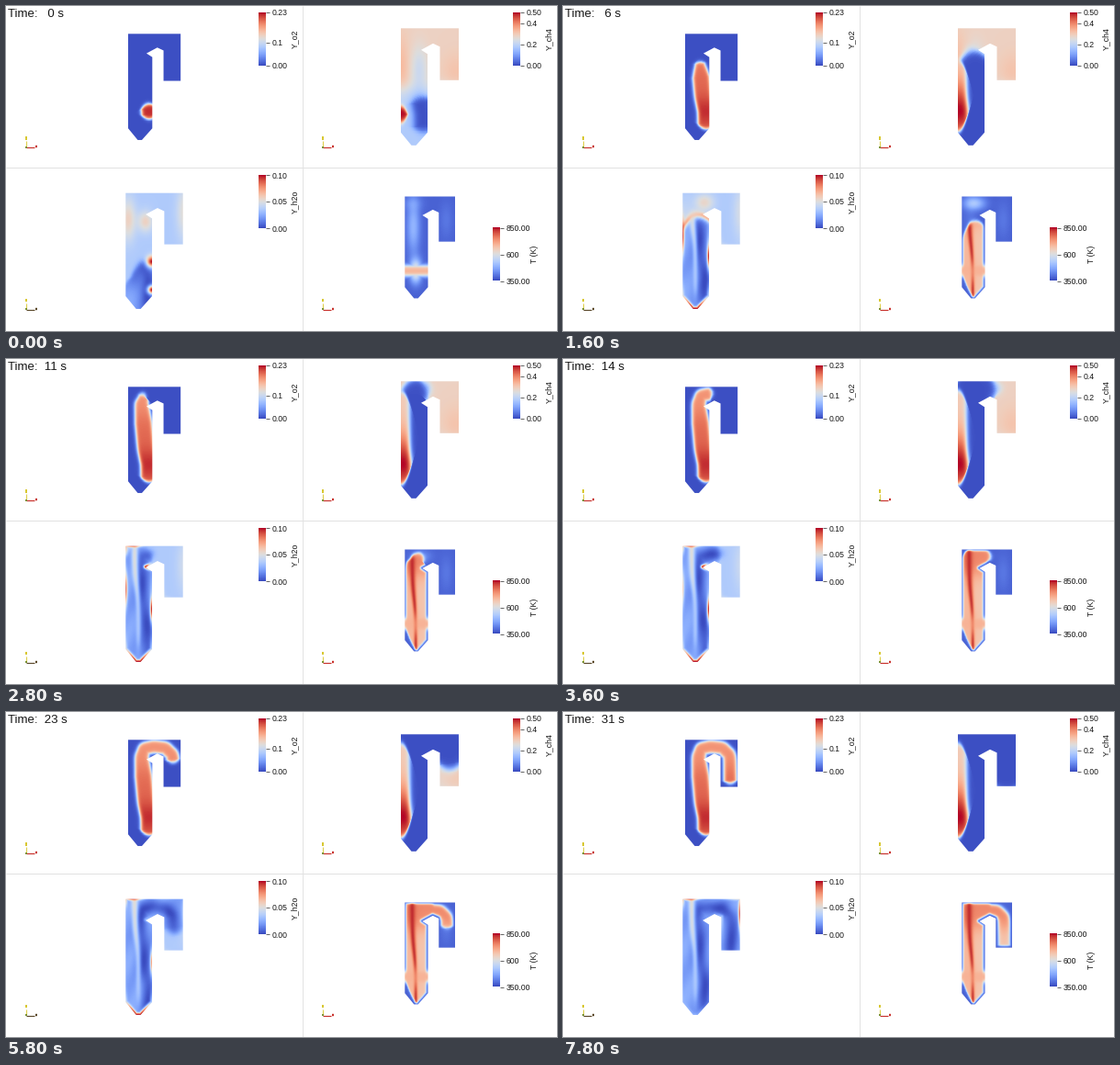
A matplotlib script for the animation above (8 s loop, 600 px wide and 354 px high).

```python
import numpy as np
import matplotlib.pyplot as plt
from matplotlib.animation import FuncAnimation
from matplotlib.patches import Polygon

W, H, DPI = 600, 354, 100
FRAMES, STEP = 40, 200
FONT = "Liberation Sans"
INK = "#161616"

# Reactor outline in its own units: riser, hood, and side duct.
OUTLINE = np.array([
    (0, 0), (63, 0), (63, 56.5), (42.5, 56.5), (42.5, 20), (35, 16.5),
    (22, 23.5), (29, 28), (29, 113.5), (16.5, 127.5), (11.5, 127.5), (0, 113.5)])
# Centre line of the gas stream.
STREAM = np.array([(25, 128), (25, 94), (21, 75), (18, 42), (16, 22),
                   (19, 12), (30, 9.5), (44, 11), (53, 20), (53.5, 60)])
INLET = 94
X, Y = np.meshgrid(np.arange(63) + 0.5, np.arange(128) + 0.5)


def soft(z):
    return 1 / (1 + np.exp(-np.clip(z, -40, 40)))


def bell(z):
    return np.exp(-z * z)


def blob(x, y, rx, ry):
    return bell((X - x) / rx) * bell((Y - y) / ry)


def mix(f, mask, value):
    return f + (value - f) * mask


def wall_distance():
    best = np.full(X.shape, 99.0)
    for (ax_, ay), (bx, by) in zip(OUTLINE, np.roll(OUTLINE, -1, axis=0)):
        dx, dy = bx - ax_, by - ay
        t = np.clip(((X - ax_) * dx + (Y - ay) * dy) / (dx * dx + dy * dy), 0, 1)
        best = np.minimum(best, np.hypot(X - ax_ - t * dx, Y - ay - t * dy))
    return best


def stream_coords():
    """Length along the stream, zero at the inlet, and distance from it."""
    u = np.linspace(0, len(STREAM) - 1, 400)
    bump = np.hanning(35) / np.hanning(35).sum()
    px, py = (np.convolve(
        np.pad(np.interp(u, np.arange(len(STREAM)), c), 17, "reflect",
               reflect_type="odd"), bump, "valid") for c in STREAM.T)
    arc = np.r_[0, np.cumsum(np.hypot(np.diff(px), np.diff(py)))]
    arc -= arc[np.argmin(abs(py[:200] - INLET))]
    dist = np.hypot(X[..., None] - px, Y[..., None] - py)
    return arc[dist.argmin(-1)], dist.min(-1)


WALL = wall_distance()
ALONG, ACROSS = stream_coords()


def front(s):
    return 9 + 16 * s ** 0.64


def plume(head, tail, width, k=1.1, bend=16):
    """Soft body of gas with a rounded head and tail."""
    cap = ACROSS ** 2 / bend
    edge = np.minimum(head - ALONG - cap, ALONG + tail - cap)
    return soft(np.minimum(edge, width - ACROSS) / k)


def oxygen(s):
    head = front(s)
    width = np.interp(ALONG, (50, 80), (10, 7.5))
    width = width * np.clip(0.3 + (head - ALONG) / 40 + s / 25, 0, 1)
    if s == 0:
        width = 9
    m = plume(head, 9 + 3 * min(s, 4), width)
    value = 0.76 + 0.1 * soft((Y - 35) / 8) + 0.1 * bell((Y - INLET) / 18)
    return mix(0.01, m, value)


def purge(s):
    return plume(front(s) + 10, 19 + 10 * s, 11 + 6 * s, 2.2, 24)


def methane(s):
    f = (0.57 + 0.09 * blob(0, 45, 9, 35) + 0.06 * blob(60, 50, 15, 22)
         - 0.13 * blob(20, 45, 9, 25) - 0.22 * soft((Y - 66) / 5))
    f = mix(f * (1 - 0.27 * (s / 31) ** 6), purge(s), 0.01)
    rise = min(front(s), 84)
    sides = 9.5 + 2 * bell((Y - INLET) / 15) - X
    ends = np.minimum(rise - INLET + Y, 9 + 2.5 * min(s, 4) + INLET - Y) - X ** 2 / 6
    m = soft(np.minimum(sides, ends) / 1.5)
    return mix(f, m, 0.6 + 0.4 * bell((Y - 90) / 32))


# Saturated spots: x, y, reach along the wall, first and last second.
SPOTS = ((0, 48, 14, 3, 14), (29, 70, 10, 3, 24), (8, 0, 7, 9, 60),
         (38, 0, 10, 15, 20), (63, 17, 13, 24, 60), (22, 23, 4, 9, 21),
         (14, 126, 14, 3, 28))


def steam(s):
    start = np.exp(-s / 5)
    f = (0.35 + 0.22 * start * (blob(22, 32, 8, 11) + blob(3, 30, 8, 22))
         + 0.17 * np.exp(-s / 20) * blob(64, 22, 8, 28)
         + 0.2 * bell((s - 6) / 3) * blob(24, 11, 10, 9))
    m = plume(front(s) + 10, 60, 30, 2, 24)
    calm = (0.22 - 0.19 * bell(ACROSS / 8) + 0.03 * np.sin(Y / 9 + X / 5 + s / 4)
            - 0.12 * start * blob(12, 92, 9, 20))
    f = mix(f, m, calm) + 1.5 * bell((s - 6) / 3) * m * (1 - m) * (Y < 70)

    top = soft((45 - Y) / 9)
    streak = bell((X - 14 + 4 * top) / (2.6 + top)) * soft((110 - Y) / 5)
    f = mix(f, 0.85 * streak * m * min(s / 5, 1), 0.36 + 0.2 * top)

    for y, r in ((76, 6), (107, 4.5)):
        f = mix(f, blob(29, y, r, r) * bell(s / 2), 1)
    rim = bell(WALL / 2)
    for x, y, reach, on, off in SPOTS:
        live = soft((s - on) * 2) * soft((off - s) / 1.2)
        f = mix(f, rim * blob(x, y, reach, reach) ** 0.6 * live, 1)
    return f


def heat(s):
    grow = min(s / 3, 1)
    head = front(s) + 4
    lead = min(10 + s, 55)
    f = (0.05 + 0.05 * blob(52, 30, 8, 22) + 0.22 * np.exp(-s / 4) * blob(11, 38, 8, 34)
         + 0.28 * bell((s - 6) / 5) * blob(lead, 9, 13, 8))
    width = np.interp(ALONG, (70, 100), (30, 7.5))
    m = plume(head, 9 + 30 * grow, width, 1.2) * soft((WALL - 2) / 0.6) * grow
    left = 0.05 * soft((14 - X) / 3)
    f = mix(f, m, 0.62 + left + 0.17 * soft((32 - Y) / 6))
    band = np.maximum(soft((6.5 - abs(Y - INLET + 1)) / 1.5), 0.8 * blob(14, 93, 7, 14))
    f = mix(f, band, 0.68)
    centre = 14 - 4.5 * soft((60 - Y) / 12)
    core = bell((X - centre) / (2.3 + 1.2 * soft((60 - Y) / 8)))
    fade = 1 - 0.6 * bell((Y - INLET) / 14)
    return mix(f, core * fade * m, 0.96)


fig = plt.figure(figsize=(W / DPI, H / DPI), dpi=DPI, facecolor="white")
ax = fig.add_axes([0, 0, 1, 1])
ax.axis("off")


def text(x, y, label, px, **kw):
    return ax.text(x, y, label, fontsize=px * 72 / DPI, family=FONT, color=INK, **kw)


def line(xs, ys, color, width):
    ax.plot(xs, ys, color=color, lw=width * 72 / DPI, solid_capstyle="butt")


def picture(data, x0, y0, x1, y1):
    return ax.imshow(data, extent=(x0, x1, y1, y0), cmap="coolwarm", vmin=0, vmax=1,
                     interpolation="bilinear", aspect="auto")


def vessel(field, x, y, scale):
    img = picture(field(0), x, y, x + 63 * scale, y + 128 * scale)
    img.set_clip_path(Polygon(OUTLINE * scale + (x, y), transform=ax.transData))
    return img, field


def colorbar(x, y, ticks, title):
    picture(np.linspace(1, 0, 64)[:, None], x, y, x + 8, y + 58)
    for at, label in ticks:
        ty = y + 58 * at
        line([x + 7.5, x + 12], [ty, ty], "#555555", 0.9)
        text(x + 14.5, ty, label, 8.6, va="center_baseline")
    tx = x + (45 if x == 530 else 40)
    text(tx, y + 29, title, 8.8, rotation=90, ha="center", va="center")


def triad(x, y, base):
    line([x, x], [y - 12, y - 8.5], "#d8c832", 2)
    line([x + 0.5, x + 0.5], [y - 7, y - 1], "#e0d050", 1.2)
    line([x + 0.5, x + 9], [y, y], base, 1.2)
    line([x - 0.8, x + 1.2], [y - 0.5, y - 0.5], "#6f8a2a", 1.8)
    line([x + 10.5, x + 12.8], [y - 0.8, y - 0.8], base, 2.4)


line([322.7, 322.7], [0, H], "#e2e2e2", 1)
line([0, W], [175.7, 175.7], "#e2e2e2", 1)

views = [vessel(oxygen, 133, 30.3, 0.907), vessel(methane, 430, 24.3, 1.0),
         vessel(steam, 130.3, 203.7, 0.99), vessel(heat, 434.3, 207.5, 0.87)]

colorbar(275, 7, [(0, "0.23"), (0.565, "0.1"), (1, "0.00")], "Y_o2")
colorbar(552, 7, [(0, "0.50"), (0.2, "0.4"), (0.6, "0.2"), (1, "0.00")], "Y_ch4")
colorbar(275, 184, [(0, "0.10"), (0.5, "0.05"), (1, "0.00")], "Y_h2o")
colorbar(530, 241.5, [(0, "850.00"), (0.5, "600"), (1, "350.00")], "T (K)")

for tx in (21.5, 344.5):
    for ty in (154.2, 330.5):
        triad(tx, ty, "#5c4a2c" if tx < 300 < ty else "#c8322d")

clock = text(2.5, 12, "", 13.3, va="baseline")
ax.set_xlim(0, W)
ax.set_ylim(H, 0)


def draw(i):
    s = i - (i + 3) // 5  # the clock pauses once every five ticks
    clock.set_text(f"Time: {s:3d} s")
    for img, field in views:
        img.set_data(np.clip(field(s), 0, 1))
    return [clock] + [img for img, _ in views]


anim = FuncAnimation(fig, draw, frames=FRAMES, init_func=lambda: draw(0),
                     interval=STEP, repeat=True, repeat_delay=0)
plt.show()
```
